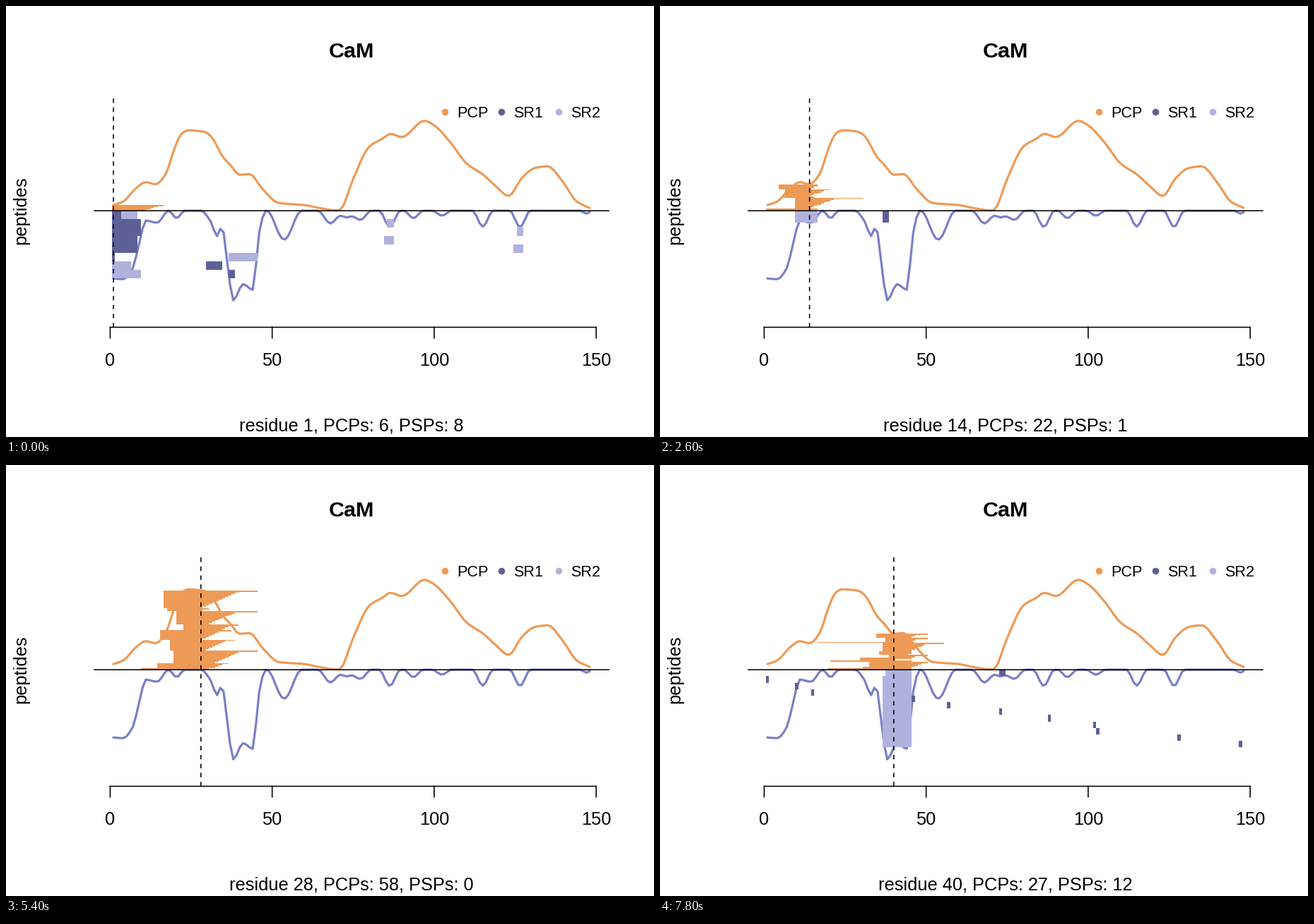
Recreate the animation shown at these times as a matplotlib script. Size 917 px wide and 611 px high, loop 8 s.

```python
import numpy as np
import matplotlib.pyplot as plt
from matplotlib.animation import FuncAnimation
from matplotlib.collections import PolyCollection

W, H, DPI = 917, 611, 100
LINE = 30.5                    # one margin line in pixels
EM = LINE / 1.2                # base text size
LWD = 1.59                     # base line width
LEFT, RIGHT = 4.1 * LINE, W - 2.1 * LINE
TOP, BOTTOM = 4.1 * LINE, H - 5.1 * LINE
MID, BASE = (LEFT + RIGHT) / 2, (TOP + BOTTOM) / 2
N = 148
UNIT = (RIGHT - LEFT) / ((N - 1) * 1.08)
ORANGE, VIOLET, DARK, LIGHT = "#ed9a56", "#7a7fc6", "#5d6095", "#b0b2de"

# Turning points of the two coverage curves: residue, height
HILLS = [
    (1, 8), (4, 13), (8, 32), (11, 40.5), (14, 37.5), (17, 51), (20, 90),
    (22, 109), (24, 114), (29, 112), (31, 106), (35, 75), (37, 65.5), (40, 51),
    (43, 52), (47, 31), (52, 11), (60, 8), (65, 3.5), (70, 0.4), (71, 1.5),
    (75, 45), (80, 91), (84, 102), (86.5, 109), (90, 104.5), (97, 127.5),
    (100, 121), (105, 97), (110, 67), (115, 51.5), (119, 35), (123, 21),
    (127, 46), (131, 60.5), (135, 63), (140, 39), (144, 13), (148, 4),
]
BASINS = [
    (1, 96), (4, 97), (7, 81), (9, 45), (11, 14), (14.5, 17), (18, 0), (28, 0),
    (31, 15), (33, 36), (34.5, 22), (36, 68), (38, 127), (41, 104), (44, 112),
    (46, 31), (48, 0), (148, 0),
]
# Single dips: centre, depth, half width
DIPS = [
    (20.5, 10.5, 2.5), (53.7, 41, 5.4), (68, 18, 3.9), (73, 9.5, 4),
    (77.2, 13, 3.4), (86.3, 23, 3.3), (93.6, 10.5, 3), (102.4, 7, 3),
    (115, 22.5, 3.2), (126.5, 23, 3.2), (147, 4, 2),
]

# Unspliced peptides from bottom to top: start, count, shortest end, longest end
GROUPS = [
    (1, 6, 10, 16), (2, 2, 12, 13), (10, 9, 14, 30), (15, 4, 32, 36),
    (20, 9, 32, 45), (31, 2, 37, 45), (19, 8, 29, 38), (16, 7, 28, 37),
    (6, 2, 12, 15), (7, 6, 14, 20), (23, 4, 34, 39), (33, 4, 46, 50),
    (5, 4, 14, 16), (21, 10, 30, 45), (30, 7, 35, 45), (39, 2, 46, 50),
    (36, 3, 44, 45), (37, 6, 45, 55), (18, 3, 27, 30), (17, 14, 27, 45),
    (38, 3, 45, 50), (35, 3, 45, 50),
]
# Ends grow by one; the topmost peptide of a group is the longest
PCPS = [(start, low + k if k < n - 1 else high)
        for start, n, low, high in GROUPS for k in range(n)]

# Spliced peptides: first part, second part
PSPS = [
    ((1, 3), (4, 8)), ((1, 9), (86, 87)), ((1, 9), (126, 127)),
    ((1, 8), (85, 87)), ((1, 8), (125, 127)), ((73, 74), (38, 45)),
    ((1, 1), (37, 45)), ((30, 34), (1, 6)), ((37, 38), (1, 9)),
    ((37, 38), (10, 16)), ((114, 116), (33, 37)), ((114, 115), (32, 37)),
] + [((p, p), (37, 45)) for p in (10, 15, 46, 57, 73, 88, 102, 103, 128, 147)]


def px(r):
    return LEFT + (r - 1 + 0.04 * (N - 1)) * UNIT


def smooth(points, at):
    """Monotone cubic through the points, level at every turning point."""
    x, y = np.array(points, float).T
    d = np.diff(y) / np.diff(x)
    a, b = d[:-1], d[1:]
    mean = 2 * np.maximum(a * b, 0) / np.maximum(abs(a + b), 1e-9) * np.sign(a)
    m = np.concatenate([d[:1], mean, d[-1:]])
    i = np.clip(np.searchsorted(x, at, side="right") - 1, 0, len(x) - 2)
    h = x[i + 1] - x[i]
    t = (at - x[i]) / h
    return ((1 + 2 * t) * (1 - t) ** 2 * y[i] + t * (1 - t) ** 2 * h * m[i]
            + t * t * (3 - 2 * t) * y[i + 1] + t * t * (t - 1) * h * m[i + 1])


def dip(at, centre, depth, half):
    u = np.clip((at - centre) / half, -1, 1)
    return depth * np.cos(u * np.pi / 2) ** 2


def box(span, top, bottom):
    a, b = px(span[0] - 0.5), px(span[1] + 0.5)
    return [(a, top), (b, top), (b, bottom), (a, bottom)]


def inside(r, span):
    return span[0] <= r <= span[1]


residues = np.arange(1, N + 1)
hills = smooth(HILLS, residues)
dips = smooth(BASINS, residues) + sum(dip(residues, *d) for d in DIPS)

plt.rcParams["font.family"] = "Liberation Sans"
fig = plt.figure(figsize=(W / DPI, H / DPI), dpi=DPI, facecolor="white")
ax = fig.add_axes([0, 0, 1, 1])
ax.set(xlim=(0, W), ylim=(H, 0))
ax.axis("off")


def stroke(xs, ys, color="black", width=LWD, **kw):
    return ax.plot(xs, ys, color=color, lw=width * 72 / DPI, snap=False, **kw)[0]


def label(x, y, text, size=EM, ha="center", **kw):
    return ax.text(x, y, text, fontsize=size * 72 / DPI, ha=ha, va="baseline", **kw)


curve = dict(width=2 * LWD, solid_joinstyle="round", solid_capstyle="round", zorder=2)
stroke(px(residues), BASE - hills, ORANGE, **curve)
stroke(px(residues), BASE + dips, VIOLET, **curve)
stroke([LEFT, RIGHT], [BASE] * 2, zorder=4)

stroke([px(0), px(150)], [BOTTOM] * 2, solid_capstyle="projecting")
for v in (0, 50, 100, 150):
    stroke([px(v)] * 2, [BOTTOM, BOTTOM + LINE / 2])
    label(px(v), 510, str(v))

for k, (name, color) in enumerate((("PCP", ORANGE), ("SR1", DARK), ("SR2", LIGHT))):
    x = 621 + 80.35 * k
    ax.plot(x, 149.7, "o", color=color, ms=9.6 * 72 / DPI, mew=0)
    label(x + 17, 157.5, name, 0.85 * EM, ha="left")

label(MID, 73, "CaM", 1.2 * EM, weight="bold")
label(28, BASE, "peptides", rotation=90, rotation_mode="anchor")
caption = label(MID, 602, "")

bars = {c: ax.add_collection(PolyCollection([], facecolors=c, edgecolors="none", zorder=3),
                             autolim=False)
        for c in (ORANGE, DARK, LIGHT)}
cursor = stroke([0, 0], [BOTTOM, TOP], zorder=5, dashes=(4, 4), dash_capstyle="butt")


def stack(spans, height):
    """Share the height evenly among the spans, going away from the base line."""
    step = height / max(len(spans), 1)
    return [box(s, BASE + k * step, BASE + (k + 1) * step) for k, s in enumerate(spans)]


def draw(i):
    r = i + 1
    pcps = [p for p in PCPS if inside(r, p)]
    psps = [p for p in PSPS if inside(r, p[0]) or inside(r, p[1])]
    bars[ORANGE].set_verts(stack(pcps, -hills[i]))
    bars[DARK].set_verts(stack([a for a, _ in psps], dips[i]))
    bars[LIGHT].set_verts(stack([b for _, b in psps], dips[i]))
    cursor.set_xdata([px(r)] * 2)
    caption.set_text(f"residue {r}, PCPs: {len(pcps)}, PSPs: {len(psps)}")
    return [*bars.values(), cursor, caption]


anim = FuncAnimation(fig, draw, frames=40, interval=200, repeat=True, repeat_delay=0)
plt.show()
```
